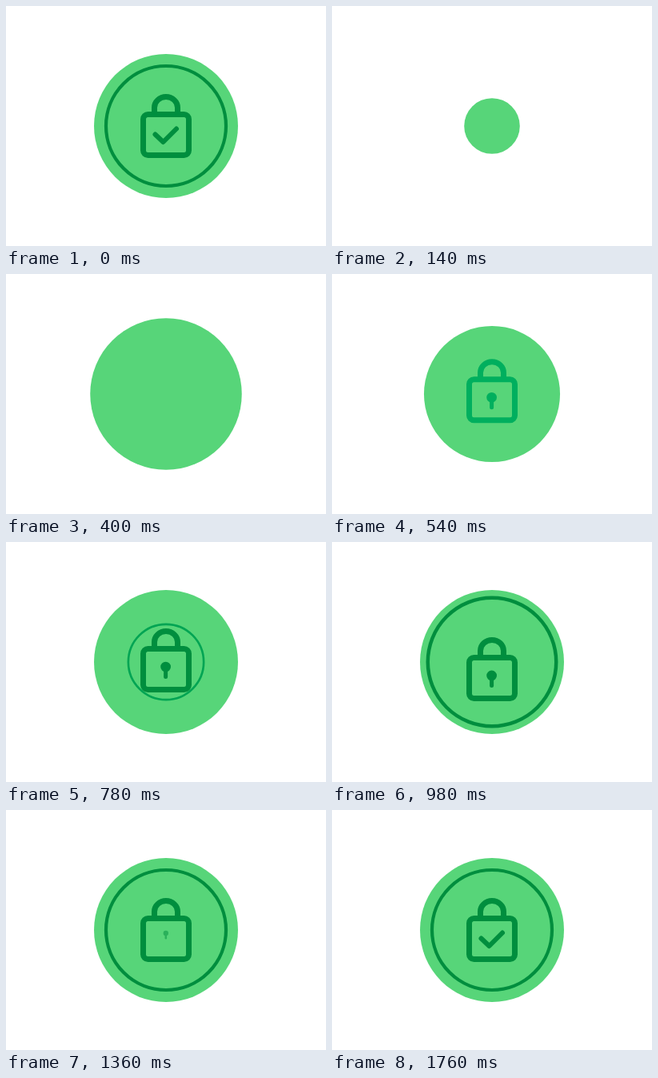
Recreate the animation shown at these times as an HTML page. Size 400 by 300 pixels, loop 2830 ms.

```html
<!DOCTYPE html>
<html lang="en">
<head>
<meta charset="utf-8">
<title>Lock badge</title>
<style>
  html, body { margin: 0; width: 100%; height: 100%; overflow: hidden; background: #fff; }
  svg { display: block; width: 100%; height: 100%; }
</style>
</head>
<body>
<svg viewBox="0 0 400 300">
  <g transform="translate(200 150)" fill="none" stroke-linecap="round" stroke-linejoin="round">
    <circle id="disc" r="90" fill="#57d579"/>
    <circle id="ring" r="75" stroke-width="4.2"/>
    <g id="lock" stroke-width="7">
      <rect x="-28.5" y="-14.5" width="57" height="51" rx="6"/>
      <path d="M-14.5 -15 V-23 A14.5 13.5 0 0 1 14.5 -23 V-15"/>
      <g id="keyhole">
        <circle cx="-.4" cy="8" r="3.2" stroke-width="6.4"/>
        <path d="M-.4 8 V20.5" stroke-width="5"/>
      </g>
      <path id="check" d="M-13.5 10.5 L-3.5 20 L13 3.5" stroke-width="6"/>
    </g>
  </g>
</svg>
<script>
const LOOP = 2830, STEP = 20;
const [disc, ring, lock, keyhole, check] =
  ['disc', 'ring', 'lock', 'keyhole', 'check'].map(id => document.getElementById(id));

const clamp = p => Math.max(0, Math.min(1, p));
const ease = p => (1 - Math.cos(Math.PI * p)) / 2;
const progress = (t, from, to) => clamp((t - from) / (to - from));

// Eased interpolation through [time, value] keys.
function track(t, keys) {
  let [time, value] = keys[0];
  for (const [nextTime, nextValue] of keys) {
    if (t < nextTime) return value + (nextValue - value) * ease(progress(t, time, nextTime));
    [time, value] = [nextTime, nextValue];
  }
  return value;
}

const pop = (t, start) => track(t, [
  [start, 0], [start + 297, 1.1], [start + 520, .945], [start + 690, 1]
]);

const setScale = (node, s) => node.setAttribute('transform', `scale(${s})`);
const setOpacity = (node, value) => node.setAttribute('opacity', value);

function darken(node, t, from, to) {
  const p = progress(t, from, to);
  node.setAttribute('stroke', `rgb(0,${208 - 66 * p},${126 - 64 * p})`);
  setOpacity(node, clamp(p * 2));
}

function draw(t) {
  if (t < STEP) t = LOOP;
  setScale(disc, pop(t, 20));
  setScale(ring, pop(t, 618));
  darken(ring, t, 620, 860);

  const y = track(t, [[440, 0], [650, -8], [970, 9], [1200, 0]]);
  lock.setAttribute('transform', `translate(0 ${y})`);
  darken(lock, t, 440, 640);

  const swap = track(t, [[1240, 1], [1480, 0]]);
  setScale(keyhole, swap);
  setOpacity(keyhole, swap);

  const shown = track(t, [[1480, 0], [1760, 1]]);
  setScale(check, shown);
  setOpacity(check, shown);
}

function frame() {
  const t = performance.now() % LOOP;
  draw(Math.floor(t / STEP) * STEP);
  requestAnimationFrame(frame);
}
frame();
</script>
</body>
</html>
```
